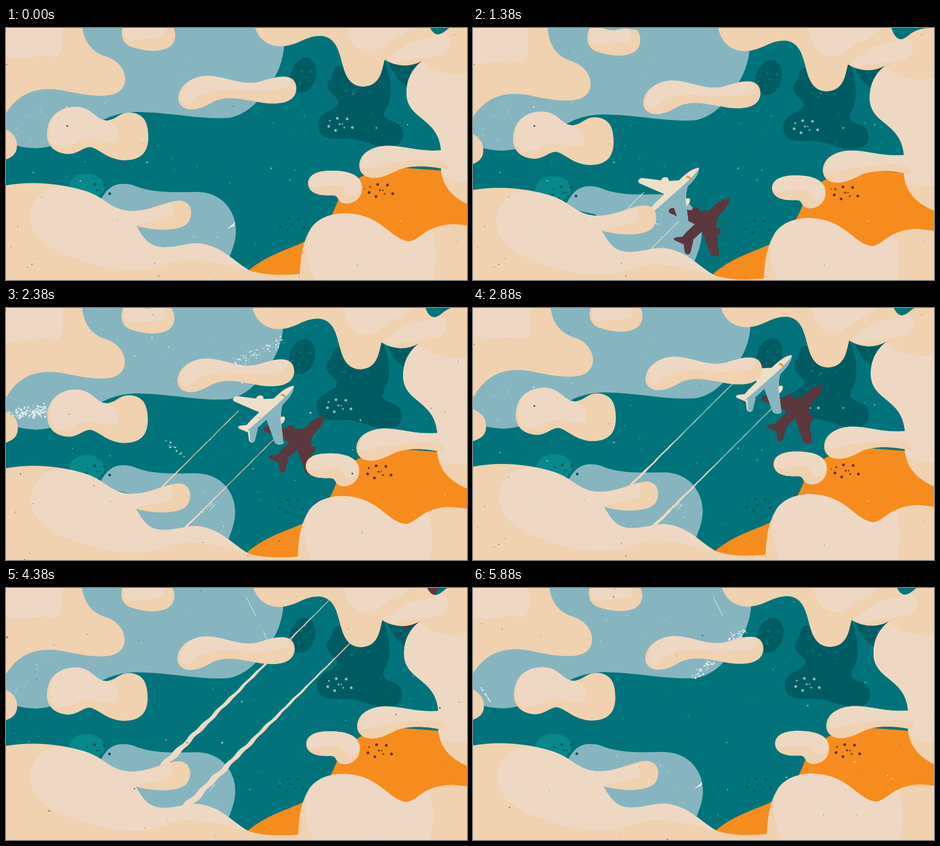
Write an HTML page that moves like this. It is 800x438 px and loops after 6010 ms.

```html
<!DOCTYPE html>
<html lang="en">
<head>
<meta charset="utf-8">
<title>Plane above the clouds</title>
<style>
  html, body { margin: 0; width: 100%; height: 100%; overflow: hidden; background: #00747a; }
  svg { display: block; width: 100vw; height: 100vh; }
  .blue { fill: #86b5c0; }
  .deep { fill: #005c63; }
  .tan { fill: #f0d1b0; }
  .light { fill: #eed8c4; }
  .white { fill: #e6ece8; }
</style>
</head>
<body>
<svg viewBox="0 0 800 438" preserveAspectRatio="none">
  <defs>
    <g id="silhouette">
      <path d="M340 213Q341 207 348 207L380 211Q383 204 391 206Q394 209 393 212L414 211L388 236L342 216Z"/>
      <path d="M427 218L398 246L413 288Q420 294 428 289L424 256Q432 250 430 243Q425 241 423 244L424 228Z"/>
      <path d="M349 262Q349 258 355 258L374 256L366 270L352 264Z"/>
      <path d="M381 258L366 268L368 284Q373 291 378 285L383 264Z"/>
      <path d="M446 189C434 190 424 199 412 210L371 249L358 264Q362 270 369 267L384 261L426 222C437 211 445 202 446 189Z"/>
    </g>
  </defs>
  <rect width="800" height="438" fill="#00747a"/>
  <g id="land">
    <path class="blue" d="M-10 -10H480C488 30 480 65 462 93C440 128 418 150 388 156C340 160 290 147 230 146C195 146 175 155 150 170C110 195 80 209 50 209C30 208 15 205 -10 195Z"/>
    <ellipse class="deep" cx="516" cy="82" rx="22" ry="31" transform="rotate(16 516 82)"/>
    <path class="deep" d="M575 66C566 70 570 85 560 92C552 105 568 115 576 125C582 142 545 142 541 165C540 192 560 194 590 192C620 192 640 210 670 206C695 203 695 172 676 164C655 158 652 152 662 136C672 115 668 85 656 55Z"/>
    <path class="deep" d="M664 58C672 85 690 103 712 108L740 60Z"/>
    <ellipse cx="140" cy="276" rx="31" ry="23" fill="#07888a"/>
    <path class="blue" d="M160 308C175 275 190 266 220 273C260 290 300 284 335 285C375 287 399 318 399 352C399 370 393 385 385 405L215 405V320Z"/>
    <path fill="#f68c1e" d="M418 424C450 395 490 385 517 372C555 350 565 328 575 303C590 270 620 244 690 243L812 252V450H430Z"/>
    <g id="dots"></g>
  </g>
  <g id="grit" class="white"></g>
  <use id="shadow" href="#silhouette" fill="#5c373d"/>
  <g id="trails" fill="#eedac5"></g>
  <g id="plane">
    <use href="#silhouette" fill="#efdfc9"/>
    <g class="blue">
      <path d="M427 218L398 246L413 288Q420 294 428 289L424 256L422 242Z"/>
      <path d="M381 258L369 267L370 284Q374 289 378 285L383 264Z"/>
      <path d="M446 191C437 203 427 212 414 224L364 268L384 261L426 222C437 211 445 202 446 191Z"/>
    </g>
    <path d="M424 203Q431 202 432 210L429 209Q428 206 424 207Z" fill="#f0932f"/>
  </g>
  <g id="clouds">
    <path class="tan" d="M-20 -20H131C131 22 148 42 175 50C205 60 214 90 201 106C187 124 145 118 110 111C70 101 25 103 -2 152L-20 160Z"/>
    <path class="light" d="M-20 -20H98C95 10 104 42 86 51C60 44 25 57 -20 52Z"/>
    <path class="tan" d="M206 -10C196 10 201 30 222 34C240 40 265 43 282 34C297 25 296 5 288 -5Q266 -9 250 -4Q235 -3 225 -10Z"/>
    <path class="light" d="M208 -10C200 10 206 23 222 22C240 15 262 22 274 14C280 8 279 0 274 -7Q260 -8 250 -4Q235 -3 225 -10Z"/>
    <path class="tan" d="M-20 168C5 176 19 185 19 204C19 220 10 228 -20 234Z"/>

    <path class="tan" d="M71 185C72 150 95 138 120 137C150 137 155 160 175 161C195 158 195 147 215 147C240 148 247 165 247 190C247 215 235 230 205 230C175 228 165 212 147 207C135 206 125 219 108 219C85 218 71 205 71 185Z"/>
    <path class="light" d="M76 190C72 150 95 138 120 137C150 137 155 160 175 161C190 165 200 180 193 195C180 206 150 185 125 197C100 211 79 211 76 190Z"/>

    <path class="tan" d="M299 122C300 98 325 83 350 83C385 84 410 103 445 92C475 82 503 78 504 105C503 130 475 134 445 130C400 122 385 118 360 128C340 140 325 144 312 140C303 136 299 130 299 122Z"/>
    <path class="light" d="M304 122C305 98 325 83 350 83C385 84 410 103 445 92C465 86 480 82 492 87C500 98 482 110 455 109C415 113 380 102 348 112C328 119 322 132 312 133Q304 130 304 122Z"/>

    <path class="tan" d="M428 -20C432 20 455 32 478 32C510 30 520 12 550 14C595 22 570 100 620 102C650 100 652 75 657 55C675 66 700 70 722 57C700 75 695 95 695 115C697 160 750 155 755 212L755 248C758 275 775 298 815 312V-8C790 -10 775 -5 765 3C758 9 752 12 748 11C740 9 735 2 730 -20Z"/>
    <path class="light" d="M588 -20C590 20 605 40 630 42C655 40 660 20 690 12L732 -20Z"/>
    <path class="light" d="M660 51C690 36 700 18 735 18C755 8 775 3 770 35C760 58 700 46 675 62Z"/>
    <path class="light" d="M722 59C700 75 695 95 695 115C697 160 750 155 755 212L755 248C758 262 775 270 815 265V75C780 90 745 77 722 59Z"/>

    <path class="tan" d="M613 238C615 212 645 203 670 205C700 207 720 216 758 212L768 247C730 238 700 239 680 247C655 260 640 264 625 258C615 253 613 245 613 238Z"/>
    <path class="light" d="M617 242C615 212 645 203 670 205C700 207 720 216 768 212V233C720 222 690 236 665 235C645 234 630 250 617 242Z"/>

    <path class="tan" d="M524 270C525 252 545 247 570 248C600 249 618 258 618 278C618 298 600 307 588 305C572 302 580 290 565 291C545 292 525 288 524 270Z"/>
    <path class="light" d="M526 276C524 252 545 247 570 248C600 249 618 258 616 281C608 298 593 290 587 278C572 266 545 280 526 276Z"/>

    <path class="tan" d="M510 450C509 400 515 370 530 347C545 327 570 322 590 322C655 325 665 367 700 371C720 368 730 341 780 341L815 345V450Z"/>
    <path class="light" d="M545 450C523 420 514 380 530 347C545 327 570 322 590 322C655 325 665 367 700 371C714 369 722 357 737 350C751 378 748 420 735 450Z"/>

    <path class="tan" d="M-20 278C30 264 90 268 140 284C175 297 180 314 213 318C250 319 270 303 300 300C322 300 326 322 317 337C307 352 265 355 226 344C238 363 246 380 272 381C300 382 320 370 345 376C380 384 398 408 422 421C445 430 480 430 516 427V450H-20Z"/>
    <path class="light" d="M62 285C22 325 40 375 115 399C190 425 240 428 285 408C325 394 380 412 424 422C398 408 380 384 345 376C320 370 300 382 272 381C246 380 238 363 226 344C240 336 270 336 287 328C296 320 285 312 290 303C270 308 250 319 213 318C180 314 175 297 140 284C110 275 85 270 62 285Z"/>
  </g>
  <g id="dust" fill="#37403f"></g>
</svg>
<script>
const $ = id => document.getElementById(id);
const LOOP = 6010, STEP = 125, STEPS = 48;

function random(seed) {
  return () => (seed = (seed * 16807) % 2147483647) / 2147483647;
}
const speck = (x, y, w, h) => `M${x.toFixed(1)} ${y.toFixed(1)}h${w.toFixed(1)}l-.4 ${h.toFixed(1)}h${(-w * .8).toFixed(1)}z`;

function scatter(rnd, count, max) {
  let d = '';
  for (let k = 0; k < count; k++)
    d += speck(rnd() * 800, rnd() * 438, .6 + rnd() ** 3 * max, .6 + rnd() ** 3 * max);
  return d;
}

// Flakes along a worn streak
function streak(rnd, x1, y1, x2, y2, spread, count, size) {
  let d = '';
  for (let k = 0; k < count; k++) {
    const u = rnd(), off = (rnd() + rnd() - 1) * spread;
    d += speck(x1 + (x2 - x1) * u + off * .5, y1 + (y2 - y1) * u + off,
      .7 + rnd() * size * 1.5, .6 + rnd() * size);
  }
  return d;
}

// Repeated cluster of dots: x, y, radius
const cluster = [[575, 157, 2.4], [592, 158, 2.4], [562, 161, 1.6], [560, 171, 2.4],
  [572, 178, 2.4], [601, 173, 2.4], [579, 167, 1.7], [584, 167, 1.2], [587, 173, 1.5]];
const dots = (dx, dy, color) =>
  cluster.map(([x, y, r]) => `<circle cx="${x + dx}" cy="${y + dy}" r="${r}" fill="${color}"/>`).join('');
$('dots').innerHTML = dots(0, 0, '#8dbac3') + dots(70, 115, '#5a3033') + dots(-84, 174, '#0b5a60') +
  dots(-421, 115, '#0b5559') + dots(30, -62, '#0f6c72') + dots(-62, -82, '#0f6c72') + dots(112, -84, '#0f6c72');

// Paper textures: plain, lined, and two worn ones
const hairline = 'M416 15l1 0 17 34-1 0zM446 75l1 0 7 16-1 0z';
const wear = {
  N: r => streak(r, 0, 190, 70, 125, 10, 14, 1),
  L: r => hairline + streak(r, 0, 190, 70, 125, 10, 14, 1),
  X: r => streak(r, -4, 188, 76, 174, 12, 170, 2.6) + streak(r, 395, 95, 480, 55, 9, 75, 2) +
    streak(r, 265, 222, 310, 258, 10, 16, 1.8) + streak(r, 530, 228, 480, 260, 10, 14, 1.8),
  Y: r => hairline + streak(r, 378, 156, 472, 72, 9, 130, 2.6) + streak(r, 12, 172, 26, 192, 7, 22, 2)
};
const textures = {};
Object.keys(wear).forEach((name, k) => {
  const rnd = random(7919 * (k + 3));
  textures[name] = { grit: wear[name](rnd) + scatter(rnd, name === 'X' ? 130 : 85, 2.6), dust: scatter(rnd, 42, 2.4) };
});
const order = 'NNLYYLNXXLN';
const mark = 'M384 349L398 337 396 344Z';
const slashes = 'M344 353l14-14 1 1zM350 357l12-16 1 1zM338 357l5-4 1 1z';

// Cloud drift: time, left x, right x, y
const drift = [[0, 0, 0, 0], [875, -1.5, -7, 8.5], [1875, -.5, -8, 8], [2875, 4, -6, 1.5],
  [4375, .5, -5, 1], [5125, 2, -7, 4.5], [5875, 0, 0, .4], [LOOP, 0, 0, 0]];
function driftAt(t) {
  const k = drift.findIndex((d, n) => n && t <= d[0]);
  const a = drift[k - 1], b = drift[k];
  const u = (t - a[0]) / (b[0] - a[0]), e = u * u * (3 - 2 * u);
  return a.map((v, n) => v + (b[n] - v) * e).slice(1);
}
function shift(el, [left, right, y], amount) {
  el.setAttribute('transform',
    `matrix(${1 + (right - left) * amount / 800} 0 0 1 ${left * amount} ${y * amount})`);
}

const SPEED = .1073;
// Vapour widens with age; x + y = sum along the whole line
function trail(startX, sum, lead, t, phase) {
  const end = Math.min(lead, 640);
  if (end <= startX) return '';
  const fade = Math.max(0, Math.min(1, (t - 5200) / 550));
  const upper = [], lower = [];
  for (let x = startX; ; x = Math.min(x + 3, end)) {
    const age = Math.max(0, lead - x) / SPEED;
    const base = Math.max(1.1, 14 * (age / 3850) ** 1.5) * (1 - fade);
    const side = p => base / 2 * (1 + .2 * Math.sin(x / 3.6 + p) + .13 * Math.sin(x / 7.3 + p * 2)) * Math.SQRT1_2;
    const a = side(phase), b = side(phase + 2.1), y = sum - x;
    upper.push(`${(x - a).toFixed(1)} ${(y - a).toFixed(1)}`);
    lower.unshift(`${(x + b).toFixed(1)} ${(y + b).toFixed(1)}`);
    if (x >= end) break;
  }
  return fade < 1 ? `<path d="M${upper.concat(lower).join('L')}Z"/>` : '';
}

function draw(time) {
  const i = Math.min(STEPS - 1, Math.floor((time + 5) / STEP));
  const t = i * STEP, move = driftAt(t);
  shift($('clouds'), move, 1);
  shift($('land'), move, .5);

  const dx = SPEED * (t - 1875);
  $('plane').setAttribute('transform', `translate(${dx} ${-dx})`);
  $('shadow').setAttribute('transform', `translate(${dx + 53} ${52 - dx})`);
  $('trails').innerHTML = trail(255, 582, 350 + dx, t, 0) + trail(300, 693, 411 + dx, t, 1.3);

  const slot = i % order.length, paper = textures[order[slot]];
  const scrape = slot === 0 || slot === 3 ? mark : slot === 7 ? '' : slashes;
  $('grit').innerHTML = `<path d="${paper.grit}${scrape}"/>`;
  $('dust').innerHTML = `<path d="${paper.dust}"/>`;
}

const start = performance.now();
function tick() {
  draw((performance.now() - start) % LOOP);
  requestAnimationFrame(tick);
}
tick();
</script>
</body>
</html>
```
